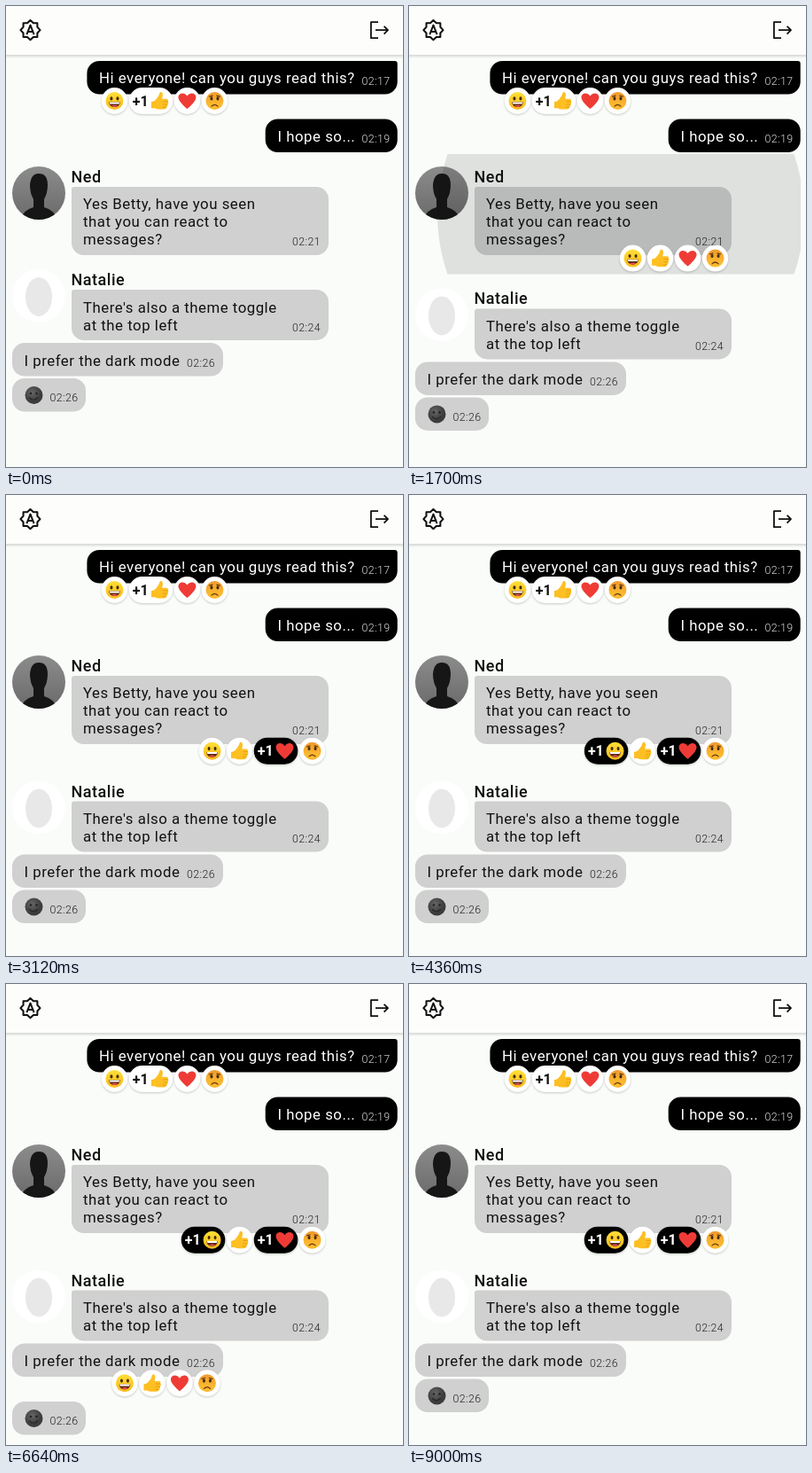
An HTML page for the animation above (9.51 s loop, 448x520 px).

```html
<!DOCTYPE html>
<html lang="en">
<head>
<meta charset="utf-8">
<title>Chat reactions</title>
<style>
  html, body { margin: 0; width: 100%; height: 100%; overflow: hidden; background: #f9fcf8; }
  svg { display: block; }
  text { font: 16.8px Roboto, sans-serif; letter-spacing: .52px; fill: #111; }
  .time { font-size: 12.4px; font-weight: 300; letter-spacing: .4px; fill: #222; }
  .own { fill: #fff; }
  .own.time { fill: #ddd; }
  .name { font-size: 18px; font-weight: 500; letter-spacing: .5px; }
  .plus { font-size: 16px; font-weight: 700; letter-spacing: 0; }
  .chip { filter: drop-shadow(0 1px 1px #0003); }
</style>
</head>
<body>
<svg id="stage" width="448" height="520" viewBox="0 0 448 520"></svg>
<script>
const LOOP = 9510, ROW = 25.5, CHIP = 29.5, WIDE = 49.5, GAP = 1.5;

const eyes = '<ellipse cx="-3.5" cy="-2.6" rx="1.5" ry="2.1" fill="#422b0d"/><ellipse cx="3.5" cy="-2.6" rx="1.5" ry="2.1" fill="#422b0d"/>';
const emojis = [
  '<circle r="10" fill="url(#skin)"/>' + eyes + `<path d="M-6.3 1.2H6.3C6 9-6 9-6.3 1.2Z" fill="#5b2b15"/>
    <path d="M-5.9 1.4H5.9L5.2 3.4H-5.2Z" fill="#fff"/><path d="M-3.5 5.8Q0 3.8 3.5 5.8Q0 8 -3.5 5.8Z" fill="#ef4a55"/>`,
  `<path d="M-9.5 1Q-6 1-3.5-2.5Q-.5-6-.2-8.5Q.5-11 2.6-9.4Q4.3-7.4 2.6-2.3H7.6Q10 -1.9 9.4.5
    Q10.5 2.3 9 4Q9.5 6 7.8 7.1Q7.7 9.5 5 9.6H-1Q-4 9.4-5.5 8.2H-9.5Z" fill="#fdbf22"/>
    <path d="M4 .8H9.2M3.8 4.1H8.9M3.4 7.2H7.7" stroke="#e59b12" stroke-width=".9" fill="none"/>`,
  '<path d="M0 9C-4 6-10-.3-10-4C-10-9.4-3-10.2 0-5.5C3-10.2 10-9.4 10-4C10-.3 4 6 0 9Z" fill="#ef3b36"/>',
  '<circle r="10" fill="url(#sadSkin)"/>' + eyes +
    `<path d="M-3.6 6.2Q0 2.6 3.6 6.2M-6-4.8L-2.4-5.8M6-4.8L2.4-5.8"
    fill="none" stroke="#6b3a12" stroke-width="1.2" stroke-linecap="round"/>`
];

const text = (x, y, s, cls = '') => `<text x="${x}" y="${y}" class="${cls}">${s}</text>`;

// Bubble with an optional tight corner on the author's side.
function bubble(x, y, w, h, fill, corner = '') {
  const r = 14, l = corner === 'left' ? 3 : r, t = corner === 'right' ? 3 : r;
  return `<path fill="${fill}" d="M${x + l} ${y}h${w - l - t}a${t} ${t} 0 0 1 ${t} ${t}v${h - t - r}
    a${r} ${r} 0 0 1 ${-r} ${r}h${2 * r - w}a${r} ${r} 0 0 1 ${-r} ${-r}v${r + l - h}a${l} ${l} 0 0 1 ${l} ${-l}z"/>`;
}

const bar = id => `<g id="${id}">` + emojis.map(e =>
  `<g><rect class="chip" y="-15" height="30" rx="15"/><text class="plus" x="4" y="5.5">+1</text><g>${e}</g></g>`
).join('') + '</g>';

const ripple = (id, x, y, top) => `<clipPath id="${id}Clip"><rect x="7" y="${top}" width="435"/></clipPath>
  <g clip-path="url(#${id}Clip)"><circle id="${id}" cx="${x}" cy="${y}" fill="#110b1a"/></g>`;

const gray = '#cfd0cf';
document.getElementById('stage').innerHTML = `
<defs>
  <linearGradient id="skin" x2="0" y2="1"><stop stop-color="#ffdf35"/><stop offset="1" stop-color="#f9b91d"/></linearGradient>
  <linearGradient id="sadSkin" x2="0" y2="1"><stop stop-color="#f09a2e"/><stop offset=".7" stop-color="#fbb930"/></linearGradient>
  <linearGradient id="photo" x2="0" y2="1"><stop stop-color="#8c8c8c"/><stop offset="1" stop-color="#6a6a6a"/></linearGradient>
  <linearGradient id="shade" x2="0" y2="1"><stop stop-color="#d5d7d5"/><stop offset="1" stop-color="#f9fcf8"/></linearGradient>
  <radialGradient id="moon" cx=".4" cy=".35"><stop stop-color="#666"/><stop offset="1" stop-color="#3c3c3c"/></radialGradient>
</defs>
<rect width="448" height="520" fill="#f9fcf8"/>
<rect width="448" height="55" fill="#fdfefc"/>
<rect y="55" width="448" height="4" fill="url(#shade)"/>
<g fill="none" stroke="#111" stroke-width="2" stroke-linejoin="round">
  <path transform="translate(13.9 13.6) scale(1.13)" stroke-width="1.8" d="M19 9V5H15L12 2.2 9 5H5V9L2.2 12 5 15V19H9L12 21.8 15 19H19V15L21.8 12Z"/>
  <path d="M23.4 32.2 27.5 21.6 31.6 32.2M25 29H30"/>
  <path stroke-width="1.8" d="M420 18.2H411.9V36.2H420M417 27.2H431M426.6 22.8 431 27.2 426.6 31.6"/>
</g>

${bubble(91.4, 62, 350.3, 37.5, '#000', 'right')}
${text(105, 87.3, 'Hi everyone! can you guys read this?', 'own')}${text(401.5, 88.5, '02:17', 'own time')}
${bar('ownBar')}
${bubble(292.7, 127.5, 149, 37.5, '#000')}
${text(306.5, 153, 'I hope so...', 'own')}${text(401.5, 153.7, '02:19', 'own time')}

<clipPath id="avatar"><circle cx="37" cy="211" r="30"/></clipPath>
<g clip-path="url(#avatar)">
  <rect x="7" y="181" width="60" height="60" fill="url(#photo)"/>
  <path d="M15 245Q17 231 31 227V218Q27 211 27 202Q28 189 37 189Q47 189 47 202Q47 211 43 218V227Q57 231 59 245Z" fill="#161616"/>
</g>
${text(73.5, 198.5, 'Ned', 'name')}
${bubble(74, 204, 290, 77, gray, 'left')}
${text(87, 229, 'Yes Betty, have you seen')}${text(87, 249, 'that you can react to')}${text(87, 269, 'messages?')}
${text(323, 270.3, '02:21', 'time')}
${ripple('rippleA', 239, 235, 167)}

<g id="afterA">
  <circle cx="37" cy="327" r="30" fill="#fff"/>
  <ellipse cx="37" cy="328" rx="15" ry="22" fill="#e8e8e8"/>
  ${text(73.5, 315, 'Natalie', 'name')}
  ${bubble(74, 320, 290, 57, gray, 'left')}
  ${text(87, 345.5, "There's also a theme toggle")}${text(87, 365.5, 'at the top left')}
  ${text(323, 366.7, '02:24', 'time')}
  ${bubble(7, 380, 238, 37.5, gray)}
  ${text(20.5, 405.5, 'I prefer the dark mode')}${text(204, 406.5, '02:26', 'time')}
  ${ripple('rippleB', 220, 400, 379)}
  <g id="afterB">
    ${bubble(7, 420, 83, 37.5, gray)}
    <g transform="translate(31.5 439)"><circle r="10" fill="url(#moon)"/>
      <circle cx="-3.5" cy="-2" r="1.3" fill="#222"/><circle cx="3" cy="-2" r="1.3" fill="#222"/>
      <path d="M-5 3Q-1 7.5 4 3" fill="none" stroke="#262626" stroke-width="1.2" stroke-linecap="round"/></g>
    ${text(49.5, 446.3, '02:26', 'time')}
  </g>
  ${bar('barB')}
</g>
${bar('barA')}`;

const el = id => document.getElementById(id);
const clamp = v => Math.min(1, Math.max(0, v));
const easeOut = (t, start, duration) => 1 - (1 - clamp((t - start) / duration)) ** 3;

// Chips are laid out from the right edge; each amount widens one chip to show its count.
function layoutBar(id, right, y, amounts, open, mine = true) {
  const group = el(id);
  group.setAttribute('opacity', clamp(open * 1.3));
  for (let i = 3; i >= 0; i--) {
    const chip = group.children[i], [back, count, emoji] = chip.children, a = amounts[i];
    const width = CHIP + (WIDE - CHIP) * a, shade = mine ? 255 * (1 - a) : 255;
    chip.setAttribute('transform', `translate(${right - width} ${y})`);
    back.setAttribute('width', width);
    back.setAttribute('fill', `rgb(${shade},${shade},${shade})`);
    count.setAttribute('opacity', a);
    count.style.fill = mine ? '#fff' : '#111';
    emoji.setAttribute('transform', `translate(${width - CHIP / 2} 0)`);
    right -= width + GAP;
  }
}

function drawRipple(id, age, height) {
  const circle = el(id);
  circle.setAttribute('r', Math.max(0, Math.min(500, age * 1.71)));
  circle.setAttribute('opacity', .11 * clamp(age / 75) * (1 - clamp((age - 220) / 250)));
  el(id + 'Clip').firstChild.setAttribute('height', height);
}

function draw(t) {
  const openA = easeOut(t, 1580, 265);
  const openB = easeOut(t, 6040, 265) - easeOut(t, 8320, 265);
  const press = start => easeOut(t, start, 300);
  el('afterA').setAttribute('transform', `translate(0 ${ROW * openA})`);
  el('afterB').setAttribute('transform', `translate(0 ${ROW * openB})`);
  layoutBar('ownBar', 250.2, 107, [0, 1, 0, 0], 1, false);
  layoutBar('barA', 360.3, 263.2 + ROW * openA, [press(4110), 0, press(2690), 0], openA);
  layoutBar('barB', 241.7, 399.2 + ROW * openB, [0, press(7320), 0, 0], openB);
  drawRipple('rippleA', t - 1580, 114 + ROW * openA);
  drawRipple('rippleB', t - 6040, 39 + ROW * openB);
}

const began = performance.now();
function tick() {
  draw((performance.now() - began) % LOOP);
  requestAnimationFrame(tick);
}
tick();
</script>
</body>
</html>
```
